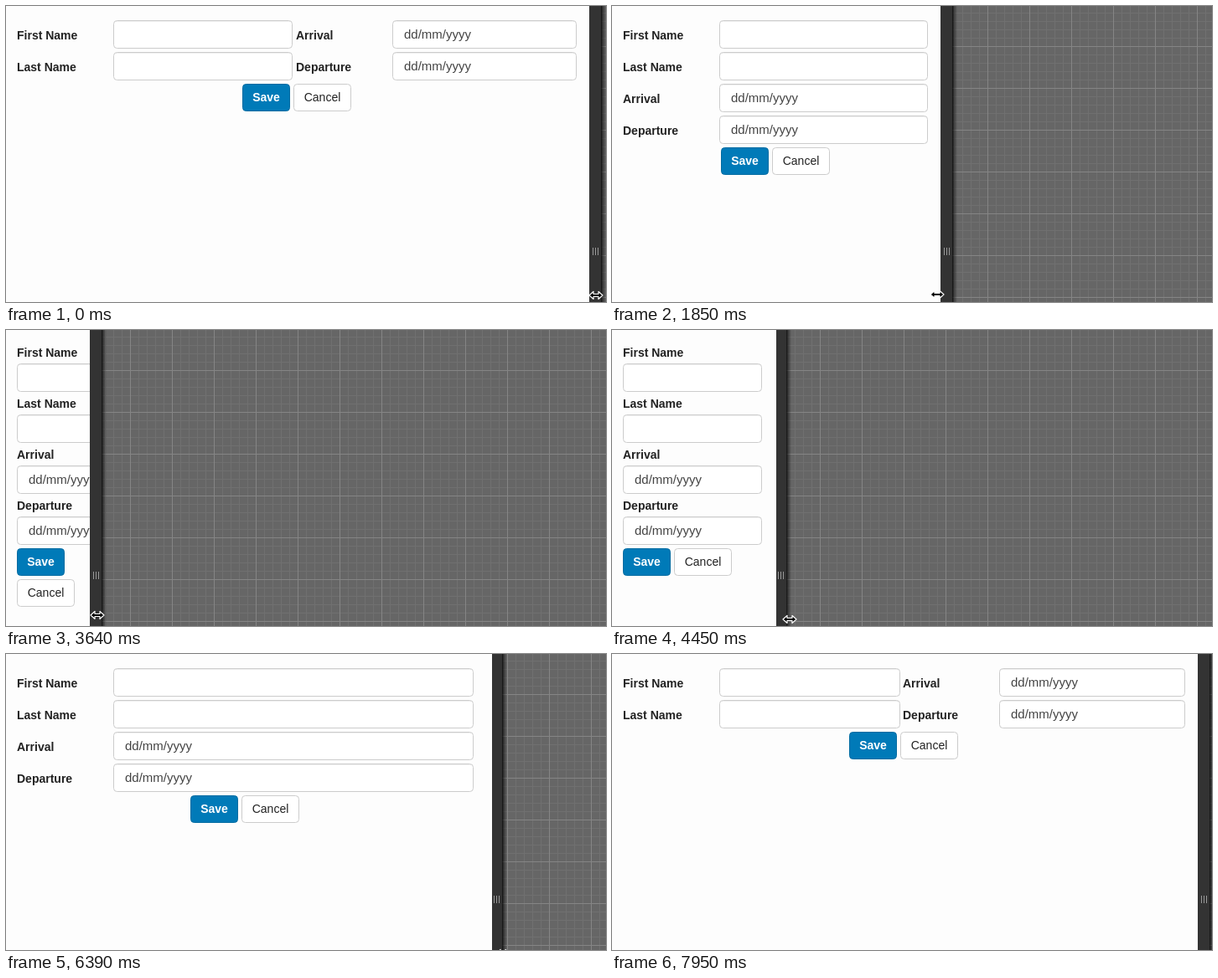
These frames come from a looping animation (716x354 px, 8.13 s). An HTML page:

```html
<!DOCTYPE html>
<html lang="en">
<head>
<meta charset="utf-8">
<title>Responsive form</title>
<style>
  html, body { margin: 0; width: 100%; height: 100%; overflow: hidden; background: #666; }
  svg { display: block; }
  text { font: 14px "Liberation Sans", Arial, sans-serif; fill: #222; white-space: pre; }
  .label { font-weight: bold; }
  .date { font-size: 15px; fill: #444; }
  .field { fill: #fff; stroke: #ccc; }
  .inset { stroke: #000; stroke-opacity: .06; }
  .save rect { fill: #007ab8; stroke: #006ba1; }
  .save text { font-weight: bold; fill: #fff; }
  .cancel rect { fill: #fff; stroke: #ccc; }
</style>
</head>
<body>
<svg id="stage" width="716" height="354" viewBox="0 0 716 354">
  <defs>
    <pattern id="minor" width="10" height="10" patternUnits="userSpaceOnUse">
      <path d="M8 0h1v10h-1zM0 8h10v1h-10z" fill="#707070"/>
    </pattern>
    <pattern id="major" width="50" height="50" patternUnits="userSpaceOnUse">
      <path d="M48 0h1v50h-1zM0 48h50v1h-50z" fill="#858585"/>
    </pattern>
    <linearGradient id="shade">
      <stop offset="0" stop-color="#000" stop-opacity=".85"/>
      <stop offset=".35" stop-color="#000" stop-opacity=".45"/>
      <stop offset="1" stop-color="#000" stop-opacity="0"/>
    </linearGradient>
  </defs>
  <rect width="716" height="354" fill="#666"/>
  <rect width="716" height="354" fill="url(#minor)"/>
  <rect width="716" height="354" fill="url(#major)"/>
  <g id="bar">
    <rect x="14" width="6" height="354" fill="url(#shade)"/>
    <rect width="14" height="354" fill="#333"/>
    <path d="M4 289h1v9h-1zM7 289h1v9h-1zM10 289h1v9h-1z" fill="#999"/>
  </g>
  <svg id="pane" height="354" overflow="hidden">
    <rect width="716" height="354" fill="#fdfdfd"/>
  </svg>
  <path id="cursor" d="M-8 0L-3 -4.5V-1.5H3V-4.5L8 0L3 4.5V1.5H-3V4.5Z"
    fill="#000" stroke="#fff" stroke-width="1.2" stroke-linejoin="round"/>
</svg>
<script>
const LOOP = 8130, TWO_COLUMNS = 640, STACKED = 320;
const TURN = 3640, PEEK = 7840, END = 7950;
const $ = id => document.getElementById(id);
const pane = $('pane'), bar = $('bar'), cursor = $('cursor');

// Drag of the bar: time, x
const drag = [[0, 696], [1040, 573], [1850, 392], [2540, 245], [3400, 97],
  [TURN, 100], [5130, 323], [6390, 577.5], [7660, 699]];

const secant = i => (drag[i + 1][1] - drag[i][1]) / (drag[i + 1][0] - drag[i][0]);
function slope(i) {
  if (i === 0 || i === drag.length - 1) return 0;
  const a = secant(i - 1), b = secant(i);
  return a * b > 0 ? 2 * a * b / (a + b) : 0;
}

// Monotone cubic through the drag points
function barX(t) {
  let i = drag.length - 2;
  while (i > 0 && drag[i][0] > t) i--;
  const [t0, x0] = drag[i], [t1, x1] = drag[i + 1], h = t1 - t0;
  const u = Math.max(0, Math.min(1, (t - t0) / h)), v = 1 - u;
  return x0 * v * v * (1 + 2 * u) + x1 * u * u * (3 - 2 * u)
    + h * u * v * (v * slope(i) - u * slope(i + 1));
}

function cursorY(t) {
  if (t >= PEEK) return t < END ? 348 : 370;
  return t < TURN ? 346 - 5 * (t / TURN) ** 3 : 341 + (t - TURN) / 160;
}

// The picture advances in steps, with two rests
function stepTime(t) {
  if (t < 60) return 0;
  const [start, end, step] = t < TURN ? [60, 3400, 57.6]
    : t < PEEK ? [TURN, 7660, 57.3] : [PEEK, END, 55];
  const k = Math.floor((t - start + 5) / step);
  return Math.min(end, Math.round((start + k * step) / 10) * 10);
}

function set(el, attrs) {
  for (const name in attrs) el.setAttribute(name, attrs[name]);
}
function add(parent, tag, attrs, content = '') {
  const el = document.createElementNS('http://www.w3.org/2000/svg', tag);
  set(el, attrs);
  el.textContent = content;
  return parent.appendChild(el);
}
const move = (el, x, y) => set(el, { transform: `translate(${x} ${y})` });

function makeField(name, isDate) {
  const label = add(pane, 'text', { class: 'label' }, name);
  const box = add(pane, 'g', {});
  const rect = add(box, 'rect', { class: 'field', x: .5, y: .5, height: 33, rx: 4 });
  const inset = add(box, 'path', { class: 'inset' });
  if (isDate) add(box, 'text', { class: 'date', x: 14, y: 22 }, 'dd/mm/yyyy');
  return { label, box, rect, inset };
}
function makeButton(name, width) {
  const g = add(pane, 'g', { class: name.toLowerCase() });
  add(g, 'rect', { x: .5, y: .5, width: width - 1, height: 32, rx: 4 });
  add(g, 'text', { x: width / 2, y: 21, 'text-anchor': 'middle' }, name);
  return g;
}

const fields = ['First Name', 'Last Name', 'Arrival', 'Departure'].map((n, i) => makeField(n, i > 1));
const save = makeButton('Save', 57), cancel = makeButton('Cancel', 69);

function placeField(field, labelX, labelY, x, y, right) {
  const width = Math.round(right) - x;
  set(field.label, { x: labelX, y: labelY });
  move(field.box, x, y);
  set(field.rect, { width: width - 1 });
  set(field.inset, { d: `M3 1.5H${width - 3}` });
}

function layout(width) {
  if (width < STACKED) {
    fields.forEach((f, i) => placeField(f, 13, 32 + 61 * i, 13, 40 + 61 * i, Math.max(145, width - 15)));
    const wrap = width < 159;
    move(save, 13, 261);
    move(cancel, wrap ? 13 : 74, wrap ? 298 : 261);
    return;
  }
  const two = width >= TWO_COLUMNS, half = (width - 30) / 2;
  fields.forEach((f, i) => {
    const second = two && i > 1, row = two ? i % 2 : i;
    const left = second ? Math.floor(13 + half) : 13;
    const right = two && !second ? 9 + half : width - 15;
    placeField(f, left, 40 + 38 * row, left + 115, 17 + 38 * row, right);
  });
  const x = Math.floor(width / 2 - 66), y = two ? 93 : 169;
  move(save, x, y);
  move(cancel, x + 61, y);
}

function draw(now) {
  const t = stepTime(now % LOOP), x = barX(t);
  const speed = (barX(t + 5) - barX(t - 5)) / 10;
  // A wide form follows the bar late; the cursor runs ahead of it
  const lag = Math.max(0, x - 390) * .17;
  move(bar, Math.round(x), 0);
  set(pane, { width: Math.round(x + Math.max(0, speed) * 16) });
  layout(Math.round(barX(t - lag)));
  move(cursor, Math.round(x + 8 + speed * 55), Math.round(cursorY(t)));
}

const begin = performance.now();
function loop() {
  draw(performance.now() - begin);
  requestAnimationFrame(loop);
}
loop();
</script>
</body>
</html>
```
